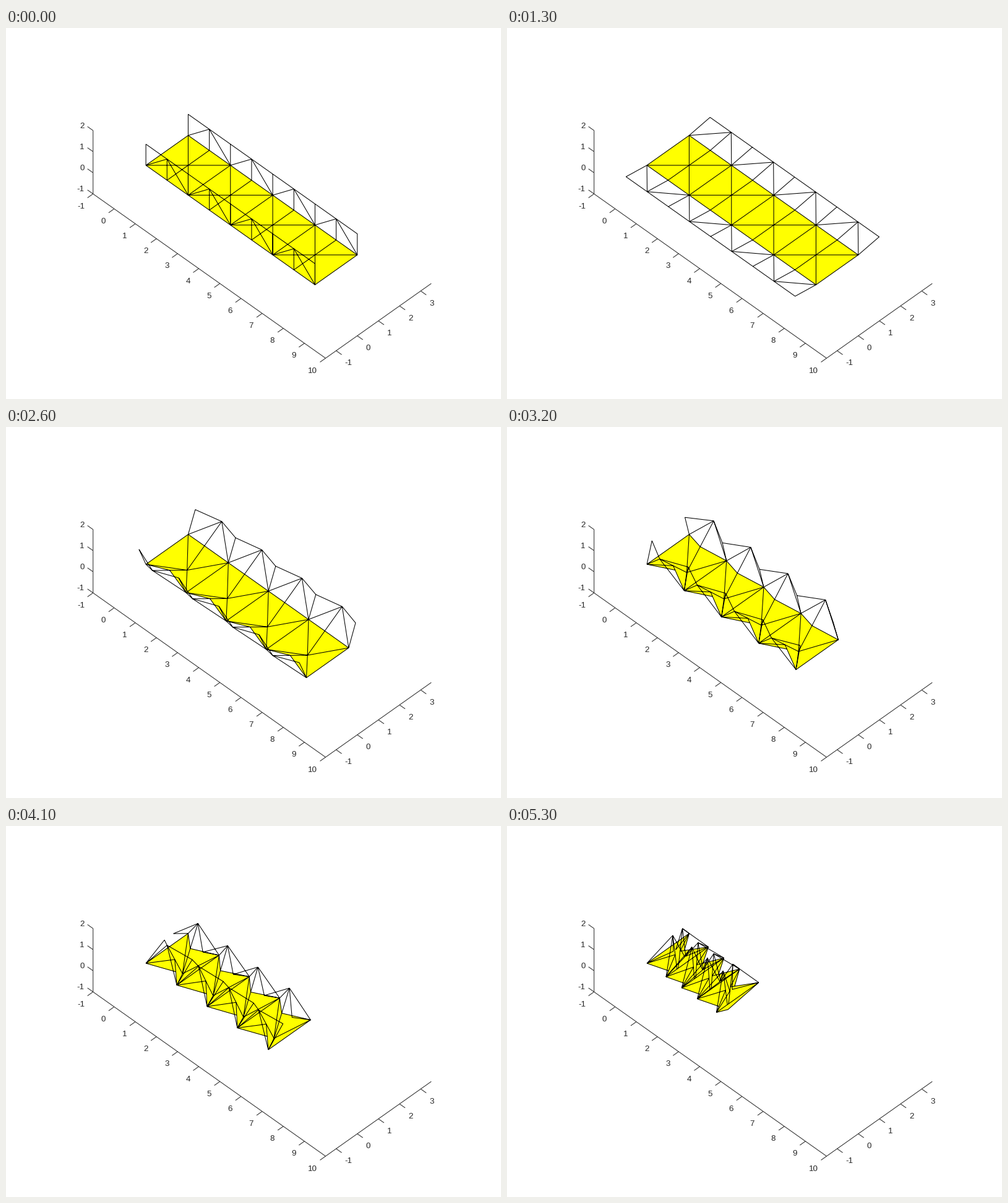
Write a matplotlib script that moves like this. It is 800x600 px and loops after 5.4 s.

```python
import numpy as np
import matplotlib.pyplot as plt
from matplotlib.animation import FuncAnimation
from matplotlib.collections import PolyCollection

W, H, DPI = 800, 600, 100
STEP_MS, FRAMES, HOLD, OPEN_STEPS = 100, 54, 4, 10
CELLS = 4

# Orthographic view, azimuth 45 and elevation 45
UNIT, ORIGIN = 48.315, np.array([226.1, 222.03])
R = np.sqrt(0.5)
SCREEN = UNIT * np.array([[R, 0.5], [R, -0.5], [0, -R]])
TOWARD = np.array([0.5, -0.5, R])


def project(p):
    return np.asarray(p, float) @ SCREEN + ORIGIN


def mirror(p):
    return p * [1, -1, 1] + [0, 2, 0]


def end_flap(q, m, angle):
    """Free corner at the left end, turned about the crease from 0 to q."""
    mid = q / 2
    v = q - m - mid
    w = np.cross(q / np.linalg.norm(q), v)
    return mid + v * np.cos(angle) - w * np.sin(angle)


def inner_flap(a, qa, qb):
    """Point at unit distance from a, qa and qb."""
    rows = np.array([qa - a, qb - a])
    p = np.linalg.pinv(rows) @ np.ones(2)
    n = np.cross(*rows)
    n /= np.linalg.norm(n)
    return a + p + n * np.sqrt(max(0.0, 1 - p @ p))


def fold_angles(n):
    mean = 0.0255 * n + 1e-4 * n ** 2
    half = 0.046 * (n / 39) ** 3.8
    return [mean - half, mean + half, mean + half, mean - half]


def model(step):
    """Return the filled triangles and the creases of one pose."""
    n = max(0, step - OPEN_STEPS)
    tilt = np.radians(9 * max(0, OPEN_STEPS - step))
    a, c, m, q = [np.zeros(3)], [], [], []
    for theta in fold_angles(n):
        h, half = np.sin(theta), np.cos(theta)
        psi = 2 * np.arctan(h)
        base = a[-1]
        c.append(base + [half, 1, -h])
        m.append(base + [half, h * np.sin(psi), h * np.cos(psi)])
        if n:
            q.append(2 * m[-1] - c[-1])
        else:
            q.append(base + [half, -np.cos(tilt), np.sin(tilt)])
        a.append(base + [2 * half, 0, 0])

    first = end_flap(q[0], m[0], 0.0749 * n)
    p = [first]
    p += [inner_flap(a[k], q[k - 1], q[k]) for k in range(1, CELLS)]
    p.append(first * [-1, 1, 1] + a[-1])

    faces, edges = [], []
    for k in range(CELLS + 1):
        edges.append((a[k], mirror(a[k])))
    for flip in (lambda v: v, mirror):
        A, M, Q, P = ([flip(v) for v in pts] for pts in (a, m, q, p))
        edges += list(zip(A, P))
        for k in range(CELLS):
            edges += [(M[k], c[k]), (M[k], Q[k])]
            for j in (k, k + 1):
                faces.append((A[j], M[k], c[k]))
                edges += [(A[j], M[k]), (A[j], c[k]), (A[j], Q[k]), (P[j], Q[k])]
    for k in range(CELLS):
        for j in (k, k + 1):
            faces.append((a[j], mirror(a[j]), c[k]))
    return np.array(faces), np.array(edges)


T = np.linspace(0, 1, 141)[None, :, None]


def visible_lines(faces, edges):
    """Sample the creases and blank the parts behind a filled face."""
    pts = edges[:, :1] * (1 - T) + edges[:, 1:] * T
    xy, depth = project(pts), pts @ TOWARD
    hidden = np.zeros(depth.shape, bool)
    for tri in faces:
        s, d = project(tri), tri @ TOWARD
        u, v = s[1] - s[0], s[2] - s[0]
        det = u[0] * v[1] - u[1] * v[0]
        if abs(det) < 2:
            continue
        r = xy - s[0]
        b1 = (r[..., 0] * v[1] - r[..., 1] * v[0]) / det
        b2 = (u[0] * r[..., 1] - u[1] * r[..., 0]) / det
        inside = (b1 > 1e-3) & (b2 > 1e-3) & (b1 + b2 < 1 - 1e-3)
        front = d[0] + b1 * (d[1] - d[0]) + b2 * (d[2] - d[0])
        hidden |= inside & (front > depth + 0.015)
    xy[hidden] = np.nan
    gap = np.full((len(edges), 1, 2), np.nan)
    return np.concatenate([xy, gap], axis=1).reshape(-1, 2)


fig = plt.figure(figsize=(W / DPI, H / DPI), dpi=DPI, facecolor="white")
ax = fig.add_axes([0, 0, 1, 1])
ax.set_xlim(0, W)
ax.set_ylim(H, 0)
ax.axis("off")

INK = "#262626"


def stroke(p, q):
    ax.plot(*zip(p, q), color=INK, lw=0.72, solid_capstyle="butt", snap=False)


def axis_line(start, end, ticks, place, tick, shift, ha):
    stroke(project(start), project(end))
    for k in ticks:
        at = project(place(k))
        stroke(at, at + tick)
        x, y = at + shift
        ax.text(x, y, str(k), color=INK, family="Liberation Sans",
                size=9.6, ha=ha, va="center")


axis_line((-1, -1.5, -1), (10, -1.5, -1), range(-1, 11),
          lambda k: (k, -1.5, -1), (-9, 6.36), (-13.8, 20.5), "right")
axis_line((10, -1.5, -1), (10, 3.5, -1), range(-1, 4),
          lambda k: (10, k, -1), (9, 6.36), (14, 20.3), "left")
axis_line((-1, -1.5, -1), (-1, -1.5, 2), range(-1, 3),
          lambda k: (-1, -1.5, k), (-9, -6.36), (-14, -6.9), "right")

sheet = PolyCollection([], facecolor="#ffff00", edgecolor="#ffff00", lw=0.3, zorder=3)
ax.add_collection(sheet, autolim=False)
creases, = ax.plot([], [], color="black", lw=0.75, solid_capstyle="butt",
                   snap=False, zorder=4)


def draw(i):
    faces, edges = model(max(0, i - HOLD))
    sheet.set_verts(list(project(faces)))
    creases.set_data(*visible_lines(faces, edges).T)
    return sheet, creases


anim = FuncAnimation(fig, draw, frames=FRAMES, interval=STEP_MS,
                     repeat=True, repeat_delay=0, blit=False)
plt.show()
```
